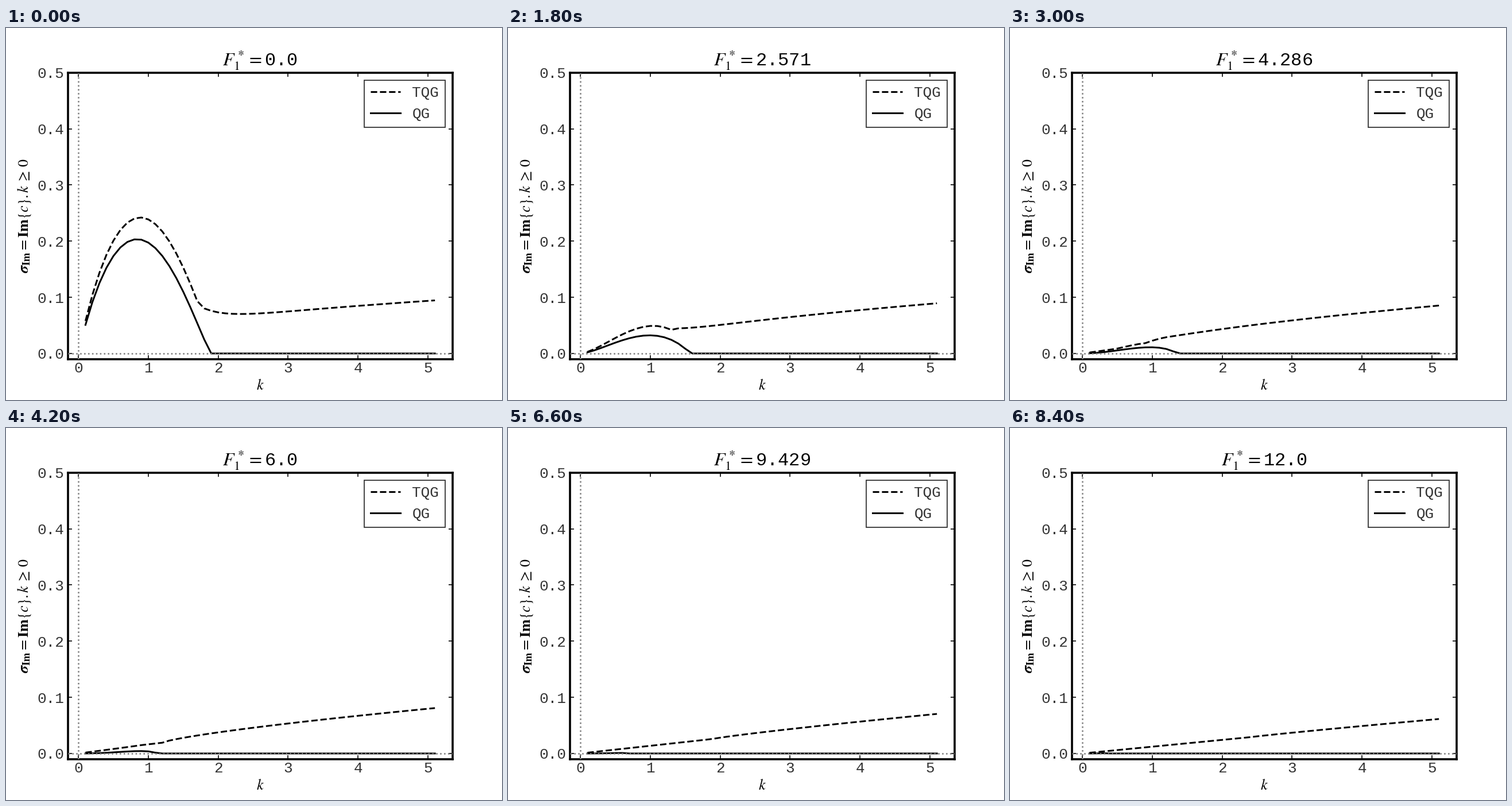
A matplotlib script that plays this animation: 864 px wide and 648 px high, repeating every 9 s.

```python
import numpy as np
import matplotlib.pyplot as plt
from matplotlib.animation import FuncAnimation

STEPS = 15
F_MAX = 12.0
K = np.arange(1, 52) / 10
K_END = K[-1]
SOFT_BLACK = "0.2"

plt.rcParams.update({
    "font.family": "Liberation Mono",
    "font.size": 13,
    "mathtext.fontset": "stix",
    "axes.titlesize": 16,
    "axes.linewidth": 1.8,
    "xtick.direction": "in",
    "ytick.direction": "in",
    "xtick.top": True,
    "ytick.right": True,
    "xtick.major.pad": 2.2,
    "xtick.labelcolor": SOFT_BLACK,
    "ytick.labelcolor": SOFT_BLACK,
    "legend.labelcolor": SOFT_BLACK,
    "legend.fancybox": False,
    "legend.edgecolor": "black",
    "patch.linewidth": 0.9,
})


def cutoff(F):
    return 1.9 - 0.13 * F


def qg_growth(k, F):
    """Unstable hump between k = 0 and the cutoff."""
    a, b = 0.95 + 0.25 * F, 1.2 * np.exp(-0.1 * F)
    peak = 0.2035 * np.exp(-0.77 * F + 0.021 * F**2)
    s = np.clip(k / cutoff(F), 0, 1)
    top = a / (a + b)
    return peak * (s / top)**a * ((1 - s) / (1 - top))**b


def thermal_growth(k, F):
    """Straight rise up to a kink, then a concave branch to the end."""
    slope = 0.0193 - 0.0006 * F
    end = 0.0945 - 0.0018 * F - 0.00008 * F**2
    power = 0.45 + 0.062 * F - 0.0018 * F**2
    kink = 0.2 * F
    u = np.clip((k - kink) / (K_END - kink), 0, 1)
    start = slope * kink
    rise = slope * np.minimum(k, kink) + (end - start) * u**power
    bump = np.exp(-0.6 * F - 3.2 * np.abs(k - cutoff(F) + 0.2))
    return rise + 0.029 * bump


def tqg_growth(k, F):
    """The faster of the shear and the thermal branch."""
    shear = (1.19 + 0.13 * F) * qg_growth(0.95 * k, F)
    return np.maximum(shear, thermal_growth(k, F))


fig, ax = plt.subplots(figsize=(6, 4.5), dpi=144)
tqg_line, = ax.plot(K, tqg_growth(K, 0), "k--", label="TQG")
qg_line, = ax.plot(K, qg_growth(K, 0), "k-", label="QG")
for axis_line in (ax.axhline, ax.axvline):
    axis_line(0, color="gray", ls=":", lw=1.3, zorder=3)

ax.set_xlim(-0.15, 5.35)
ax.set_ylim(-0.01, 0.5)
ax.set_xticks(range(6))
ax.set_yticks(np.arange(6) / 10)
ax.set_xlabel("$k$", labelpad=3)
ax.set_ylabel(
    r"$\boldsymbol{\sigma}_{\mathbf{Im}}=\mathbf{Im}\{c\}.k\:\geq\:0$")
ax.legend(loc="upper right")
title = ax.set_title("")


def update(step):
    F = F_MAX * step / (STEPS - 1)
    tqg_line.set_ydata(tqg_growth(K, F))
    qg_line.set_ydata(qg_growth(K, F))
    title.set_text(f"$F_1^*=${round(F, 3)}")
    return tqg_line, qg_line, title


anim = FuncAnimation(fig, update, frames=STEPS, interval=600, repeat=True)
plt.show()
```
